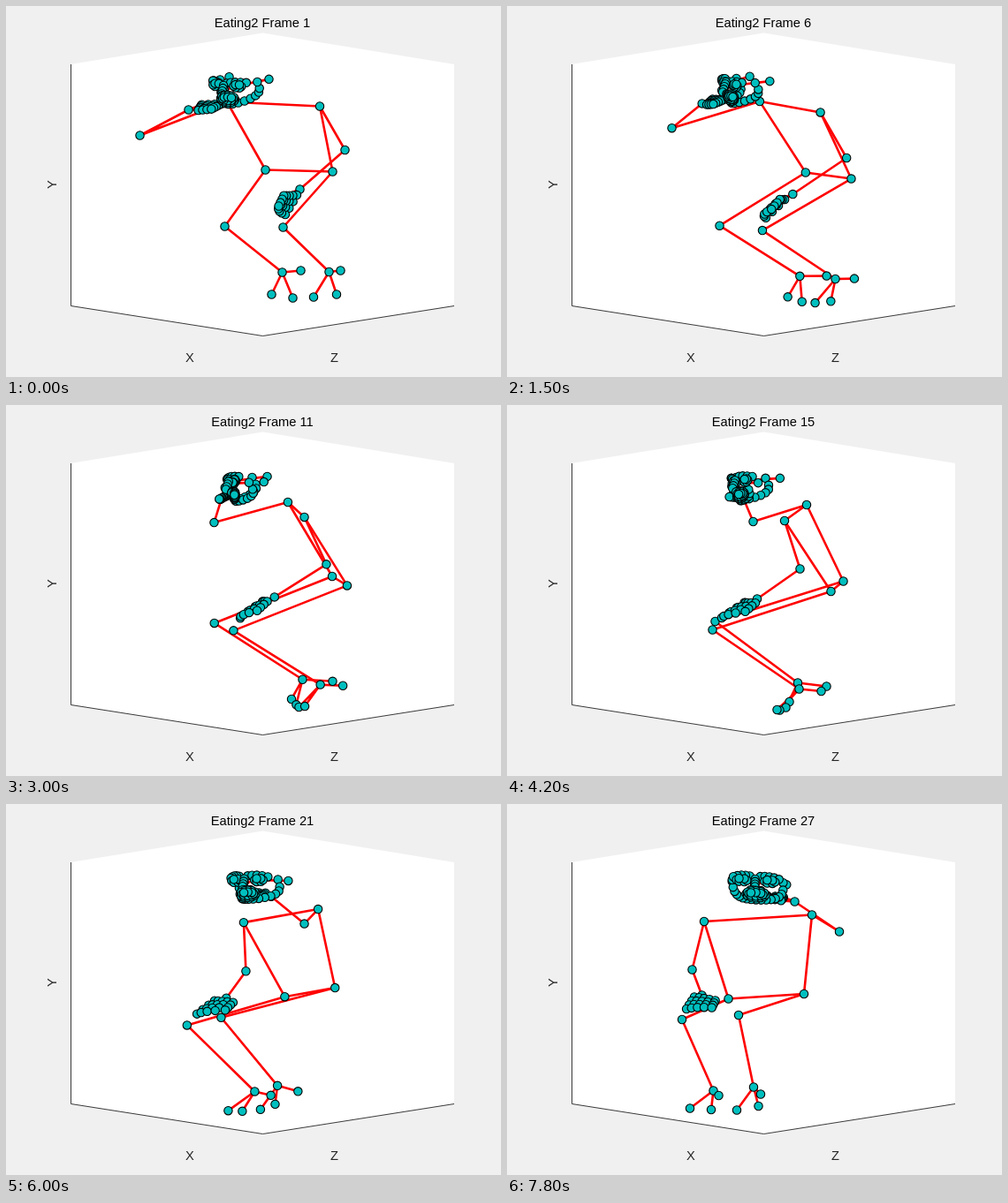
An HTML page with a canvas for the animation above (8 s loop, 560 px wide and 420 px high).

```html
<!DOCTYPE html>
<html lang="en">
<head>
<meta charset="utf-8">
<title>Eating2</title>
<style>
  html, body { margin: 0; width: 100%; height: 100%; overflow: hidden; background: #f0f0f0; }
  svg, canvas { position: absolute; left: 0; top: 0; width: 560px; height: 420px; }
  text { font: 14.67px "Liberation Sans", Arial, sans-serif; text-anchor: middle; fill: #262626; }
  #title { fill: #000; }
</style>
</head>
<body>
<svg viewBox="0 0 560 420">
  <path d="M73 66 290.5 30.500 507 66V339L290.500 373.500 73 339Z" fill="#fff"/>
  <path d="M73.500 66V339.500L290.500 373.500 507 339.500" fill="none" stroke="#262626" stroke-width=".9"/>
  <text id="title" x="290" y="24">Eating2 Frame 1</text>
  <text x="208" y="403">X</text>
  <text x="371.500" y="403">Z</text>
  <text transform="translate(56.500 202) rotate(-90)">Y</text>
</svg>
<canvas id="stage" width="560" height="420"></canvas>
<script>
const STEP = 300, LOOP = 8000, LAST = 26;
const RAD = Math.PI / 180, TURN = 5, TILT = 0.18, ROLL = 0.08, SWAY = 0.003;
const ctx = document.getElementById('stage').getContext('2d');
const title = document.getElementById('title');

// Screen positions (x, y) of each joint at three poses of the turn
const POSES = [0, 14, 26];
const joints = {
  elbowR: [151, 146, 278, 131.5, 375.5, 144],
  wristR: [206, 117, 266, 103, 325, 110],
  shoulderR: [249.5, 108, 338.5, 112.5, 344.5, 125],
  shoulderL: [354.5, 113, 313.5, 130.5, 222.5, 132.5],
  hipR: [293, 185, 380, 199, 335.5, 214.5],
  hipL: [369, 187, 366, 210.5, 250, 220],
  elbowL: [383, 162.5, 331, 185, 209, 187],
  wristL: [332, 207, 282.5, 219, 220, 216],
  kneeR: [247, 249, 235, 244.5, 261.5, 238.5],
  kneeL: [313, 250, 232, 254, 197.5, 243.5],
  ankleR: [312, 301, 328.5, 314, 278.5, 320],
  heelR: [333, 299, 361, 318, 286.5, 328],
  toeR1: [300, 326, 319, 335.5, 284, 341.5],
  toeR2: [324, 330, 315, 342, 259.5, 346],
  ankleL: [365, 300.5, 330, 321, 233, 324],
  heelL: [378, 299, 355, 323.5, 239, 329.5],
  toeL1: [347.5, 329, 308, 345, 230.5, 345.5],
  toeL2: [373.5, 326, 305, 344.5, 206.5, 344],
  head: [274.5, 81, 296, 85, 285, 89]
};
const chains = [
  'wristR elbowR shoulderR shoulderL elbowL wristL',
  'shoulderR hipR kneeR ankleR heelR',
  'shoulderL hipL kneeL ankleL heelL',
  'hipR hipL',
  'toeR1 ankleR toeR2',
  'toeL1 ankleL toeL2'
].map(s => s.split(' '));

const series = (n, fn) => Array.from({ length: n }, (_, i) => fn(i));

// Local parts use points [forward, side, down]
const handL = series(5, i => series(4, j => {
  const t = j / 3, q = i * i;
  return [14 - 0.55 * q + t * (26 - 0.9 * q), 4 - 5.5 * i, 4 + i + t * (18 - 2 * i)];
}));
const handR = series(5, i => series(4, j => {
  const t = j / 3;
  return [2 * i - 4 + t * 5, 15 + t * (28 - 2 * i), -4 + (i - 2) * 1.3 - t * 4];
}));

const ring = (n, side, down, rx, ry, fwd) => series(n, i => {
  const a = i * 2 * Math.PI / n;
  return [fwd, side + rx * Math.cos(a), down + ry * Math.sin(a)];
});
const brow = dir => series(5, i => {
  const n = 6 + 5 * i;
  return [44 - 12 * (n / 26) ** 2, dir * n, -Math.sin(i * Math.PI / 4)];
});
const jaw = series(17, i => {
  const a = i * Math.PI / 16, s = Math.sin(a);
  return [17 - 30 * s + 47 * s * s, -29 * Math.cos(a), 1 + 24 * s ** 0.7];
});
const face = [
  jaw, brow(-1), brow(1),
  ring(6, -16, 4, 6, 2, 36), ring(6, 16, 4, 6, 2, 36),
  series(4, i => [42 + i, 0, 3 + 3 * i]),
  series(5, i => [38, 3 * i - 6, 15]),
  ring(12, 0, 19, 11, 4, 35), ring(8, 0, 19, 8, 2, 35)
];
const sight = [[0, -31, 0], [38, -13, 4], [46, 0, 10], [38, 13, 4], [0, 31, 0]];

// The head leans sideways a little
const lean = part => part.map(([f, n, d]) => [f, n, d - ROLL * n]);
const headParts = [sight, ...face].map(lean);

// Trigonometric interpolation: exact for a uniform rotation
function weights(k) {
  const half = d => Math.sin(d * TURN * RAD / 2);
  return POSES.map((p, i) => POSES.reduce((w, q, j) =>
    i === j ? w : w * half(k - q) / half(p - q), 1));
}

function attach(parts, [x, y], angle) {
  const c = Math.cos(angle), s = Math.sin(angle);
  return parts.map(part => part.map(([f, n, d]) =>
    [x - f * c - n * s, y + d + TILT * (n * c - f * s)]));
}

function line(points) {
  ctx.beginPath();
  points.forEach(p => ctx.lineTo(p[0], p[1]));
  ctx.stroke();
}

function dot([x, y]) {
  ctx.beginPath();
  ctx.arc(x, y, 4.7, 0, 2 * Math.PI);
  ctx.fill();
  ctx.stroke();
}

function place(k) {
  const w = weights(k), at = {};
  // The legs drift sideways between the poses
  const sway = SWAY * POSES.reduce((v, p) => v * (k - p), 1);
  for (const name in joints) {
    const p = joints[name];
    at[name] = [0, 1].map(o => w[0] * p[o] + w[1] * p[2 + o] + w[2] * p[4 + o]);
    if (/knee|ankle|heel|toe/.test(name)) at[name][0] += sway;
  }
  return at;
}

function draw(k) {
  const at = place(k);
  const body = (k - 12) * TURN * RAD, gaze = (k - 9.3) * TURN * RAD;
  const left = attach(handL, at.wristL, body);
  const right = attach(handR, at.wristR, body);
  const head = attach(headParts, at.head, gaze);

  ctx.setTransform(1, 0, 0, 1, 0, 0);
  ctx.clearRect(0, 0, 560, 420);
  ctx.translate(0.5, 0.5);
  ctx.strokeStyle = '#f00';
  ctx.lineWidth = 2.6;
  ctx.lineJoin = 'round';
  chains.forEach(names => line(names.map(n => at[n])));
  left.forEach(f => line([at.wristL, ...f]));
  right.forEach(f => line([at.wristR, ...f]));
  head.forEach(line);

  ctx.strokeStyle = '#000';
  ctx.fillStyle = '#00bfbf';
  ctx.lineWidth = 1.1;
  for (const name in at) if (name !== 'head') dot(at[name]);
  [...left, ...right, ...head].forEach(part => part.forEach(dot));
  title.textContent = 'Eating2 Frame ' + (k + 1);
}

let shown = -1;
const start = performance.now();
function tick(now) {
  const t = Math.max(0, now - start) % LOOP;
  const k = Math.min(LAST, Math.floor(t / STEP));
  if (k !== shown) draw(shown = k);
  requestAnimationFrame(tick);
}
tick(start);
</script>
</body>
</html>
```
